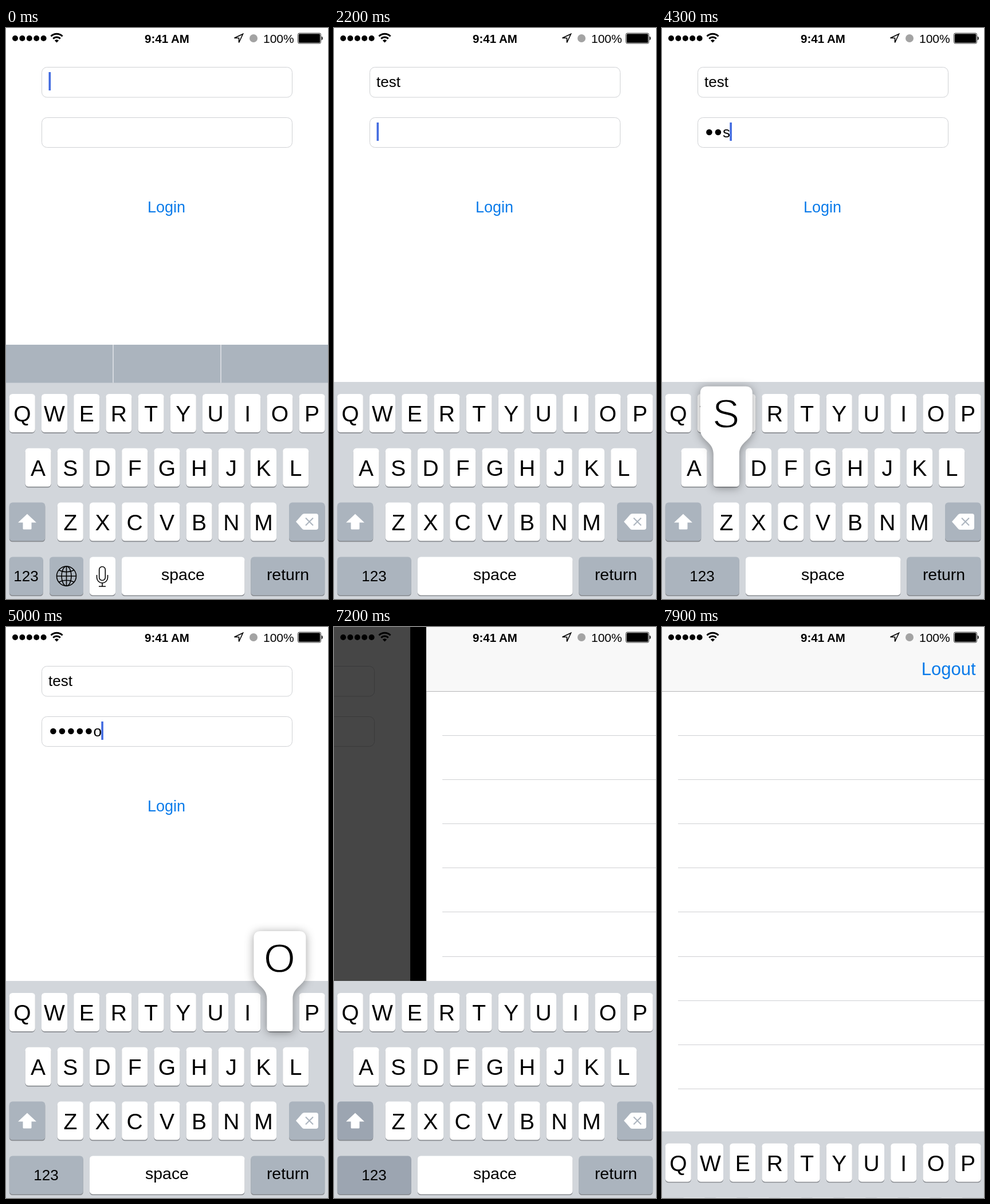
Write an HTML page that moves like this. It is 562x997 px and loops after 8 s.

```html
<!DOCTYPE html>
<html lang="en">
<head>
<meta charset="utf-8">
<title>Login flow</title>
<style>
  html, body { margin: 0; width: 100%; height: 100%; overflow: hidden; background: #000; }
  svg { display: block; width: 100%; height: 100%; font-family: "Liberation Sans", Arial, sans-serif; }
  .mid { text-anchor: middle; }
  .blue { fill: #0a7bea; }
  .field { fill: #fff; stroke: #cfd1d4; }
  .input { font-size: 26px; }
  .key { fill: #fff; }
  .key.dark { fill: #abb4be; }
  .key.side { fill: color-mix(in srgb, #98a1ad var(--shade, 0%), #abb4be); }
  .edge { fill: #888b90; }
  .letter { font-size: 39px; }
  .label { font-size: 28.4px; }
  .digits { font-size: 26px; }
  .hint { font-size: 31px; fill: #fff; }
  .line { fill: none; stroke: #000; stroke-width: 1.6; }
  #popup { filter: drop-shadow(0 2px 8px rgba(0, 0, 0, .38)); }
  #popupLetter { font-size: 71px; stroke: #fff; stroke-width: 1.8; }
</style>
</head>
<body>
<svg viewBox="0 0 562 997" xmlns="http://www.w3.org/2000/svg">
  <rect width="562" height="997"/>

  <g id="loginPage">
    <rect width="562" height="997" fill="#fff"/>
    <rect class="field" x="62.5" y="68.5" width="437" height="52.5" rx="9"/>
    <rect class="field" x="62.5" y="156.5" width="437" height="52" rx="9"/>
    <rect id="selection" x="69" y="76" height="35" fill="#cfe0f0"/>
    <text id="user" class="input" x="74" y="103"></text>
    <g id="dots"></g>
    <text id="pass" class="input" y="191"></text>
    <rect id="caret" width="3.6" height="32" fill="#426be0"/>
    <text id="login" class="mid blue" x="280" y="322" font-size="27">Login</text>
  </g>

  <g id="listPage">
    <rect width="562" height="997" fill="#fff"/>
    <rect width="562" height="112" fill="#f8f8f8"/>
    <rect y="112" width="562" height="1" fill="#b6b6b8"/>
    <g id="rows"></g>
    <text class="blue" x="547.5" y="84" font-size="31" text-anchor="end">Logout</text>
  </g>

  <g id="status">
    <g fill="none" stroke="#000" stroke-width="3">
      <path d="M78.5 14.5A14 14 0 0 1 98.5 14.5M82.3 18.8A8.5 8.5 0 0 1 94.7 18.8"/>
    </g>
    <path d="M88.5 25.5L84.8 21.8A5.3 5.3 0 0 1 92.2 21.8Z"/>
    <text class="mid" x="281" y="26" font-size="20.5" font-weight="bold">9:41 AM</text>
    <path class="line" d="M413.5 10.5L406.5 25.5V17.5H398.5Z"/>
    <circle cx="432" cy="18" r="7" fill="#a3a3a3"/>
    <text x="449" y="26" font-size="21">100%</text>
    <rect x="509.5" y="9" width="40" height="18" rx="2.5" fill="none" stroke="#000" stroke-width=".8"/>
    <rect x="510.8" y="10.3" width="37.4" height="15.4" rx="1.5"/>
    <path d="M550.8 14.5Q552.8 15 552.8 18T550.8 21.5Z"/>
  </g>

  <g id="keyboard">
    <rect y="618" width="562" height="380" fill="#d2d6db"/>
    <g id="bar">
      <rect y="553" width="562" height="66.5" fill="#abb4be"/>
      <path d="M187 553V619.5M375 553V619.5" stroke="#dfe2e6" stroke-width="1.6"/>
      <rect id="choice" x="186.5" y="553" width="189.5" height="66.5" fill="#ebedf0"/>
      <text class="hint mid" x="92" y="594" opacity=".6"></text>
      <text class="hint mid" x="278" y="594"></text>
      <text class="hint mid" x="468.5" y="594"></text>
    </g>
    <g id="keys"></g>
    <g id="textKeys"></g>
    <g id="secureKeys"></g>
    <path fill="#fff" d="M37 848.5L53 863.5H44.5V874Q44.5 875.5 43 875.5H31Q29.5 875.5 29.5 874V863.5H21Z"/>
    <path fill="#fff" d="M506 862L517 849.5Q518.5 848 520.5 848H541Q545 848 545 852V872Q545 876 541 876H520.5Q518.5 876 517 874.5Z"/>
    <path d="M523 855.5L536 868.5M536 855.5L523 868.5" stroke="#abb4be" stroke-width="2"/>
    <g id="popup">
      <path id="popupShape" fill="#fff"/>
      <text id="popupLetter" class="mid"></text>
    </g>
  </g>
</svg>

<script>
const LOOP = 8000, STEP = 100;
const KEY_W = 45, KEY_H = 67, PITCH = 56.2;
const USER_TAPS = [[300, 'T'], [700, 'E'], [1100, 'S'], [1600, 'T']];
const PASS_TAPS = [[3800, 'P'], [4100, 'A'], [4300, 'S'], [4600, 'S'],
                   [4800, 'W'], [5000, 'O'], [5400, 'R'], [5900, 'D']];
const HINTS = {
  '': ['', '', ''],
  t: ['“t”', 'to', 'the'],
  te: ['“te”', 'the', 'tell'],
  tes: ['“tes”', 'yes', 'test'],
  test: ['“test”', 'tests', 'testing']
};
const FOCUS_PASS = 2200, MASK_LAST = 6600, PUSH = 6767, HIDE_KEYS = 7788;
const BLINKS = [[2800, 3200], [6000, 6300]];
const PAGE_SHIFT = 590, KEYBOARD_H = 379;
const USER_X = 74, PASS_X = 75, DOT_PITCH = 15.5;

const $ = id => document.getElementById(id);
const show = (el, on) => { el.style.display = on ? '' : 'none'; };
const move = (el, x, y) => el.setAttribute('transform', `translate(${x} ${y})`);

function add(parent, tag, attrs, text) {
  const el = document.createElementNS('http://www.w3.org/2000/svg', tag);
  for (const name in attrs) el.setAttribute(name, attrs[name]);
  if (text) el.textContent = text;
  parent.append(el);
  return el;
}

function addKey(parent, x, y, width, style = '') {
  const box = { x, width, height: KEY_H, rx: 5.5 };
  add(parent, 'rect', { ...box, y: y + 1.7, class: 'edge' });
  add(parent, 'rect', { ...box, y, class: 'key ' + style });
}

function addLabel(parent, x, y, text, style = 'label') {
  add(parent, 'text', { x, y, class: 'mid ' + style }, text);
}

const keyPos = {};
[['QWERTYUIOP', 5.8, 639], ['ASDFGHJKL', 33.6, 733.8], ['ZXCVBNM', 89.8, 828.6]]
  .forEach(([letters, x0, y]) => [...letters].forEach((letter, i) => {
    const x = x0 + i * PITCH;
    keyPos[letter] = { x, y };
    addKey($('keys'), x, y, KEY_W);
    addLabel($('keys'), x + KEY_W / 2, y + 48, letter, 'letter');
  }));

const ROW4 = 923.4;
addKey($('keys'), 5.8, 828.6, 62.5, 'side');
addKey($('keys'), 494, 828.6, 62.5, 'dark');
addKey($('keys'), 427.3, ROW4, 129, 'dark');
addLabel($('keys'), 492, 964, 'return');

const textKeys = $('textKeys');
addKey(textKeys, 5.8, ROW4, 59, 'dark');
addKey(textKeys, 76, ROW4, 59, 'dark');
addKey(textKeys, 146, ROW4, KEY_W);
addKey(textKeys, 202, ROW4, 214.5);
addLabel(textKeys, 35, 966, '123', 'digits');
addLabel(textKeys, 309, 964, 'space');
add(textKeys, 'circle', { cx: 105.5, cy: 957, r: 17, class: 'line' });
add(textKeys, 'ellipse', { cx: 105.5, cy: 957, rx: 8.5, ry: 17, class: 'line' });
add(textKeys, 'path', { class: 'line',
  d: 'M105.5 940V974M88.5 957H122.5M92 946.5Q105.5 953 119 946.5M92 967.5Q105.5 961 119 967.5' });
add(textKeys, 'rect', { x: 162.7, y: 940.5, width: 10.6, height: 24, rx: 5.3, class: 'line' });
add(textKeys, 'path', { class: 'line', d: 'M158.5 955V959.5A9.5 9.5 0 0 0 177.5 959.5V955M168 969V975M162 975H174' });

const secureKeys = $('secureKeys');
addKey(secureKeys, 5.8, ROW4, 129, 'side');
addKey(secureKeys, 146, ROW4, 270.5);
addLabel(secureKeys, 70, 966, '123', 'digits');
addLabel(secureKeys, 281, 964, 'space');

for (let i = 0; i < 11; i++)
  add($('rows'), 'rect', { x: 28, y: Math.round(188.5 + i * 77.2), width: 534, height: 1, fill: '#cfd0d3' });
for (let i = 0; i < 5; i++)
  add($('status'), 'circle', { cx: 16 + i * 12.4, cy: 18, r: 5 });
const dots = PASS_TAPS.map((_, i) =>
  add($('dots'), 'circle', { cx: PASS_X + 7.4 + i * DOT_PITCH, cy: 182, r: 5.3 }));
const hints = document.querySelectorAll('.hint');

function bezier(x1, y1, x2, y2) {
  const at = (a, b, s) => 3 * a * s * (1 - s) ** 2 + 3 * b * s * s * (1 - s) + s ** 3;
  return x => {
    if (x <= 0) return 0;
    if (x >= 1) return 1;
    let lo = 0, hi = 1;
    for (let i = 0; i < 30; i++) {
      const mid = (lo + hi) / 2;
      if (at(x1, x2, mid) < x) lo = mid; else hi = mid;
    }
    return at(y1, y2, lo);
  };
}
const ease = bezier(.25, .1, .25, 1);
const keyboardEase = bezier(.38, .7, .125, 1);

const typed = (taps, t) =>
  taps.filter(([at]) => at <= t).map(([, letter]) => letter.toLowerCase()).join('');

function drawPopup(t) {
  const tap = [...USER_TAPS, ...PASS_TAPS].find(([at]) => t >= at - STEP && t <= at);
  show($('popup'), tap);
  if (!tap) return;
  const { x, y } = keyPos[tap[1]];
  const left = Math.min(Math.max(x - 23, 4), 465), right = left + 91;
  const end = x + KEY_W, top = y - 108, bottom = y + KEY_H;
  $('popupShape').setAttribute('d',
    `M${left + 12} ${top}H${right - 12}Q${right} ${top} ${right} ${top + 12}V${top + 75}
     C${right} ${top + 95} ${end} ${top + 96} ${end} ${top + 118}V${bottom - 5}
     Q${end} ${bottom} ${end - 5} ${bottom}H${x + 5}Q${x} ${bottom} ${x} ${bottom - 5}V${top + 118}
     C${x} ${top + 96} ${left} ${top + 95} ${left} ${top + 75}V${top + 12}Q${left} ${top} ${left + 12} ${top}Z`);
  const letter = $('popupLetter');
  letter.textContent = tap[1];
  letter.setAttribute('x', left + 45);
  letter.setAttribute('y', top + 72);
}

function caretOpacity(t) {
  const blink = BLINKS.find(([from, to]) => t >= from && t <= to);
  return !blink ? 1 : blink.includes(t) ? .5 : 0;
}

function drawFields(t) {
  const secure = t >= FOCUS_PASS;
  const name = typed(USER_TAPS, t), word = typed(PASS_TAPS, t);
  const user = $('user'), pass = $('pass');
  user.textContent = name;

  const masked = t >= MASK_LAST ? word.length : Math.max(0, word.length - 1);
  const passX = PASS_X + masked * DOT_PITCH;
  dots.forEach((dot, i) => show(dot, i < masked));
  pass.textContent = word.slice(masked);
  pass.setAttribute('x', passX);

  const corrected = name === 'tes';
  const active = secure ? pass : user;
  const end = (secure ? passX : USER_X) + (active.textContent ? active.getComputedTextLength() : 0);
  const caret = $('caret');
  caret.setAttribute('x', Math.max(74.5, end - .7));
  caret.setAttribute('y', secure ? 165 : 77);
  caret.setAttribute('opacity', caretOpacity(t));
  show($('selection'), corrected);
  $('selection').setAttribute('width', Math.max(0, end - 64.7));

  show($('bar'), !secure);
  show($('choice'), corrected);
  show(textKeys, !secure);
  show(secureKeys, secure);
  HINTS[name].forEach((hint, i) => { hints[i].textContent = hint; });
  hints[1].style.fill = corrected ? '#0a7bea' : '';
}

function draw(t) {
  drawFields(t);
  drawPopup(t);
  $('login').setAttribute('opacity', t >= MASK_LAST && t < 6800 ? .3 : 1);
  const p = ease((t - PUSH) / 1000);
  move($('loginPage'), -PAGE_SHIFT * p, 0);
  $('loginPage').setAttribute('opacity', 1 - p);
  move($('listPage'), PAGE_SHIFT * (1 - p), 0);
  // The dark gap between the pages shades the translucent keys on the left.
  $('keyboard').style.setProperty('--shade', `${400 * p * (1 - p)}%`);
  move($('keyboard'), 0, KEYBOARD_H * keyboardEase((t - HIDE_KEYS) / 400));
}

const start = performance.now();
function tick() {
  const t = (performance.now() - start) % LOOP;
  draw(Math.floor(t / STEP) * STEP);
  requestAnimationFrame(tick);
}
tick();
</script>
</body>
</html>
```
